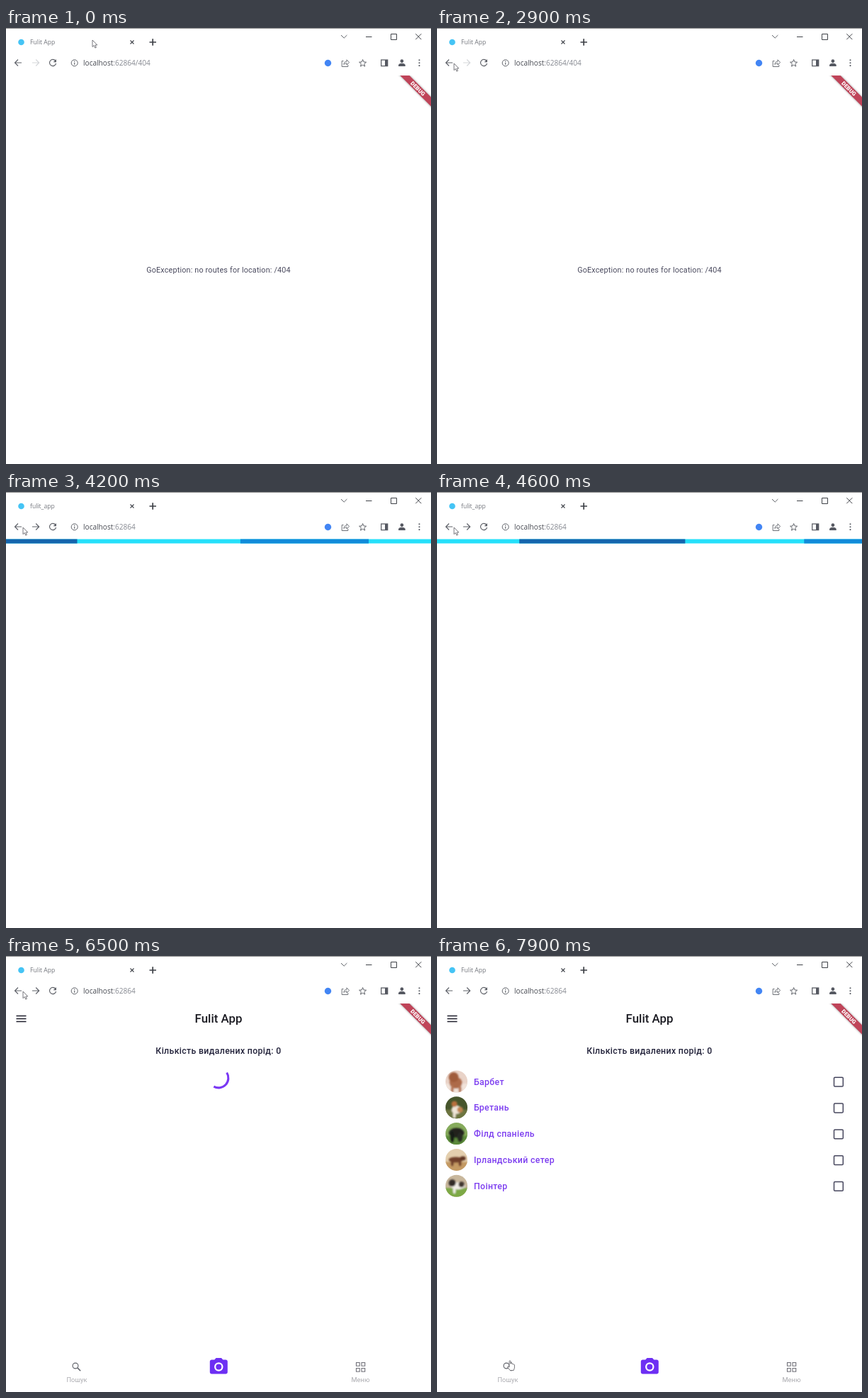
An HTML page for the animation above (8000 ms loop, 600x615 px).

```html
<!DOCTYPE html>
<html lang="uk">
<head>
<meta charset="utf-8">
<title>Fulit App</title>
<style>
html, body { margin: 0; width: 100%; height: 100%; overflow: hidden; background: #fff; }
svg { display: block; width: 600px; height: 615px; }
.ui { font-family: "Open Sans", "Noto Sans", sans-serif; }
.app { font-family: Roboto, "Noto Sans", sans-serif; }
.mid { text-anchor: middle; }
.line { fill: none; stroke: #5f6269; stroke-width: 1.15; }
.body { font-size: 12.3px; font-weight: 500; letter-spacing: .34px; }
.nav { font-size: 9.24px; letter-spacing: .1px; fill: #ababb0; }
</style>
</head>
<body>
<svg viewBox="0 0 600 615" xmlns="http://www.w3.org/2000/svg">
  <defs>
    <clipPath id="page"><rect y="67" width="600" height="548"/></clipPath>
    <clipPath id="round"><circle r="15.5"/></clipPath>
    <filter id="soft" x="-20%" y="-20%" width="140%" height="140%"><feGaussianBlur stdDeviation=".8"/></filter>
    <filter id="shade" x="-20%" y="-20%" width="140%" height="140%"><feGaussianBlur stdDeviation="1.8"/></filter>
  </defs>
  <rect width="600" height="615" fill="#fff"/>
  <rect width="600" height="1" fill="#8e8e8e"/>

  <!-- tab strip -->
  <g class="ui">
    <circle cx="21.5" cy="20" r="4.3" fill="#45c4f5"/>
    <text id="tab" x="34" y="23" font-size="8.6" fill="#74777e"></text>
  </g>
  <path class="line" d="M175.5 17.5l5 5m0-5l-5 5" style="stroke:#45484f"/>
  <path class="line" d="M202.5 20h9.5M207.2 15.2v9.5" style="stroke:#3c3f45;stroke-width:1.7"/>
  <path class="line" d="M473 10l4.2 4.2 4.2-4.2" style="stroke-width:1"/>
  <path class="line" d="M508 12.5h8.5M543.5 8.5h8v8h-8zM578.3 8.2l8 8m0-8l-8 8" style="stroke:#3f4248;stroke-width:1"/>

  <!-- toolbar -->
  <path class="line" d="M22 49H12.8M17 44.5L12.5 49l4.5 4.5"/>
  <path class="line" id="forward" d="M37 49h9.3M42.2 44.5l4.5 4.5-4.5 4.5"/>
  <path class="line" d="M69.8 46.2A4.6 4.6 0 1 0 70.6 50"/>
  <path d="M71 44v4.3h-4.3z" fill="#5f6269"/>
  <circle class="line" cx="96.7" cy="49.3" r="4.5" style="stroke-width:1"/>
  <path class="line" d="M96.7 48.8v3M96.7 46.5v1.2"/>
  <text class="ui" x="109" y="53" font-size="10.1" fill="#484b53">localhost<tspan id="path" fill="#868991"></tspan></text>
  <circle cx="454.5" cy="49.5" r="4.7" fill="#4285f4"/>
  <path class="line" d="M476.5 46.5h-2.3v8h8.6V52M476.8 51.5c.3-3 2-4.3 4.2-4.3v-2.4l3.6 3.7-3.6 3.6v-2.3c-1.8 0-3 .3-4.2 1.700z" style="stroke-width:.9"/>
  <path class="line" d="M503.6 44.5l1.4 3.4 3.6.3-2.8 2.4.9 3.5-3.1-1.9-3.1 1.9.9-3.5-2.8-2.4 3.6-.3z" style="stroke-width:1"/>
  <rect class="line" x="529.7" y="45" width="9" height="8.6" style="stroke-width:1.3"/>
  <rect x="535" y="45" width="4" height="8.6" fill="#565962"/>
  <g fill="#565962">
    <circle cx="558.9" cy="46.7" r="2.4"/>
    <path d="M554.1 54v-1.5c0-2 3.2-2.7 4.8-2.7s4.8.7 4.8 2.7V54z"/>
    <circle cx="583.5" cy="45.3" r="1.05"/><circle cx="583.5" cy="49.2" r="1.05"/><circle cx="583.5" cy="53.1" r="1.05"/>
  </g>

  <!-- error page -->
  <text id="error" class="app mid" x="300" y="345" font-size="10.8" letter-spacing=".17" fill="#4a4a5e">GoException: no routes for location: /404</text>

  <!-- loading bar -->
  <g id="loader">
    <rect y="66.5" width="600" height="6" fill="#25e0fa"/>
    <rect id="barA" y="66.5" height="6" fill="#118bd9"/>
    <rect id="barB" y="66.5" height="6" fill="#1565ad"/>
  </g>

  <!-- home page -->
  <g id="home" class="app">
    <path d="M14.5 84.5h14M14.5 88.5h14M14.5 92.5h14" stroke="#1d1d2b" stroke-width="1.4"/>
    <text class="mid" x="300" y="94" font-size="16.9" font-weight="500" fill="#1b1b22">Fulit App</text>
    <text class="mid body" x="300" y="138" fill="#22223a">Кількість видалених порід: 0</text>
    <path id="spin" fill="none" stroke="#7a38f4" stroke-width="3.08"/>
    <g id="list"></g>
    <circle class="line" cx="98" cy="578" r="3.9"/>
    <path class="line" d="M100.9 580.9l4.3 4.3" style="stroke-width:1.5"/>
    <text class="nav mid" x="100" y="600.8">Пошук</text>
    <g transform="translate(285.3 564.5) scale(1.25)" fill="#6d2ff3">
      <path fill-rule="evenodd" d="M9 2L7.17 4H4c-1.1 0-2 .9-2 2v12c0 1.1.9 2 2 2h16c1.1 0 2-.9 2-2V6c0-1.1-.9-2-2-2h-3.17L15 2zm3 15a5 5 0 1 1 0-10 5 5 0 0 1 0 10z"/>
      <circle cx="12" cy="12" r="3.2"/>
    </g>
    <path class="line" d="M494.5 573.5h4.7v4.7h-4.7zM502 573.5h4.7v4.7h-4.7zM494.5 581.5h4.7v4.7h-4.7zM502 581.5h4.7v4.7h-4.7z" style="stroke:#707078;stroke-width:1.1"/>
    <text class="nav mid" x="500.5" y="600.8">Меню</text>
  </g>

  <g id="debug" clip-path="url(#page)">
    <path d="M549.4 60h13.1L610 107.5V120.6z" fill="#000" opacity=".45" filter="url(#shade)"/>
    <path d="M549.4 60h13.1L610 107.5V120.6z" fill="#c04459"/>
    <text class="app mid" transform="translate(581.5 85.5) rotate(45)" y="2.8" font-size="7.9" font-weight="900" fill="#fff">DEBUG</text>
  </g>

  <g id="cursor" fill="#fff" stroke="#606066" stroke-width=".85" stroke-linejoin="round">
    <path id="arrow" d="M0 0V9.6L2.2 7.5 3.8 11.1 5.4 10.4 3.9 7H6.8z"/>
    <path id="hand" d="M3 9V1.5Q3.9-.3 4.9 1.5V5.2Q6 0 6.9 5.5 8.1 4.5 8.7 6 10 5.5 10.4 7V11L9.2 14.5H4.2L.3 9.8Q.5 8 3 10z"/>
  </g>
</svg>
<script>
const $ = id => document.getElementById(id);
const show = (id, on) => $(id).setAttribute('display', on ? 'inline' : 'none');
const set = (id, attrs) => { for (const k in attrs) $(id).setAttribute(k, attrs[k]); };
const clamp = v => Math.min(1, Math.max(0, v));

const LOOP = 8000, STEP = 100;

// Times in ms, then x and y
const cursorKeys = [
  [0, 122, 17], [1600, 122, 17], [1700, 116, 22], [1800, 116, 22],
  [2100, 64, 37], [2400, 36, 46], [2700, 24, 50], [7000, 24, 50],
  [7300, 60, 186], [7900, 99, 570]
];
// Loader clock in seconds; it stalls while the page is busy
const loaderKeys = [
  [3500, .515], [3700, .63], [3800, .63], [3900, .72], [4100, .72], [4200, 1.18], [4900, 1.88]
];

function sample(keys, t) {
  if (t <= keys[0][0]) return keys[0].slice(1);
  for (let i = 1; i < keys.length; i++) {
    const a = keys[i - 1], b = keys[i];
    if (t <= b[0]) {
      const k = (t - a[0]) / (b[0] - a[0]);
      return a.slice(1).map((v, j) => v + (b[j + 1] - v) * k);
    }
  }
  return keys[keys.length - 1].slice(1);
}

function bezier(x1, y1, x2, y2) {
  const at = (s, p, q) => 3 * (1 - s) * (1 - s) * s * p + 3 * (1 - s) * s * s * q + s * s * s;
  return x => {
    let lo = 0, hi = 1;
    for (let i = 0; i < 30; i++) {
      const m = (lo + hi) / 2;
      if (at(m, x1, x2) < x) lo = m; else hi = m;
    }
    return at(lo, y1, y2);
  };
}
const easeOut = bezier(0, 0, .58, 1);
const easeIn = bezier(.42, 0, 1, 1);
const fastOutSlowIn = bezier(.4, 0, .2, 1);

// Name, upper and lower backdrop, then blobs: cx, cy, rx, ry, colour
const breeds = [
  ['Барбет', '#e9d3c8', '#f1e3da', [[-1, 2, 9, 8, '#ad6a49'], [-4, -6, 7, 7, '#a05b3b'], [-6, 11, 2, 6, '#b57455'], [5, 11, 2, 6, '#b57455']]],
  ['Бретань', '#46552c', '#6d7440', [[0, 3, 7, 6, '#efe5d8'], [-3, -5, 4, 4, '#b9703c'], [5, 3, 4, 4, '#c08350'], [-3, 10, 2, 5, '#efe5d8']]],
  ['Філд спаніель', '#86ab5c', '#5b8a3a', [[0, -1, 11, 7, '#20241f'], [-6, 5, 3, 8, '#181b18'], [5, 5, 4, 7, '#252923']]],
  ['Ірландський сетер', '#e4cfae', '#c49a63', [[-1, 0, 10, 4, '#71402a'], [9, -2, 4, 3, '#5e3424'], [-6, 5, 2, 4, '#71402a'], [5, 5, 2, 4, '#71402a']]],
  ['Поінтер', '#c8b79c', '#7da944', [[2, 0, 10, 5, '#f3efe8'], [-6, -4, 5, 5, '#332b27'], [7, -2, 4, 4, '#40352e'], [-3, 6, 2, 5, '#f3efe8']]]
];
$('list').innerHTML = breeds.map(([name, top, low, blobs], i) => {
  const y = 177 + i * 36.8;
  const shapes = blobs.map(([cx, cy, rx, ry, c]) =>
    `<ellipse cx="${cx}" cy="${cy}" rx="${rx}" ry="${ry}" fill="${c}"/>`).join('');
  return `<g transform="translate(27.5 ${y})"><g clip-path="url(#round)">
      <rect x="-16" y="-16" width="32" height="32" fill="${top}"/>
      <g filter="url(#soft)"><rect x="-20" y="3" width="40" height="20" fill="${low}"/>${shapes}</g></g></g>
    <text class="body" x="52" y="${y + 4.5}" fill="#7c3df0">${name}</text>
    <rect x="560.5" y="${y - 5.7}" width="12.8" height="12.8" rx="1.3" fill="none" stroke="#47475e" stroke-width="1.5"/>`;
}).join('');

function drawLoader(s) {
  const p = s / 2, a = easeOut(p), b = easeIn(p);
  set('barA', { x: 600 * (-1 + 2 * a), width: 600 * (1 - .9 * a) });
  set('barB', { x: 600 * (-1.5 + 2.5 * b), width: 600 * (1 - .9 * b) });
}

function drawSpinner(ms) {
  const u = ms / 1333 % 1;
  const head = fastOutSlowIn(clamp(u * 2)), tail = fastOutSlowIn(clamp(u * 2 - 1));
  const start = Math.PI * (-.5 + tail * 1.5 + ms / 2222 * 2 + u * .5);
  const sweep = Math.max((head - tail) * 1.5 * Math.PI, .001);
  const point = a => `${300 + 13.9 * Math.cos(a)} ${172 + 13.9 * Math.sin(a)}`;
  set('spin', { d: `M${point(start)}A13.9 13.9 0 ${sweep > Math.PI ? 1 : 0} 1 ${point(start + sweep)}` });
}

function draw(t) {
  const back = t >= 3000, home = t >= 6200, listed = t >= 7600, hand = t >= 7800;
  $('tab').textContent = t >= 3300 && t < 5800 ? 'fulit_app' : 'Fulit App';
  $('path').textContent = back ? ':62864' : ':62864/404';
  $('forward').style.stroke = back ? '#5f6269' : '#d5d7da';
  show('error', t < 3500);
  show('debug', t < 3500 || home);
  show('loader', t >= 3500 && t < 5000);
  show('home', home);
  show('list', listed);
  show('spin', !listed);
  show('arrow', !hand);
  show('hand', hand);
  drawLoader(sample(loaderKeys, t)[0]);
  if (home) drawSpinner(Math.max(0, t - 6250));
  set('cursor', { transform: `translate(${sample(cursorKeys, t).join(' ')})` });
}

const begin = performance.now();
function tick() {
  const t = (performance.now() - begin) % LOOP;
  draw(Math.floor(t / STEP) * STEP);
  requestAnimationFrame(tick);
}
tick();
</script>
</body>
</html>
```
